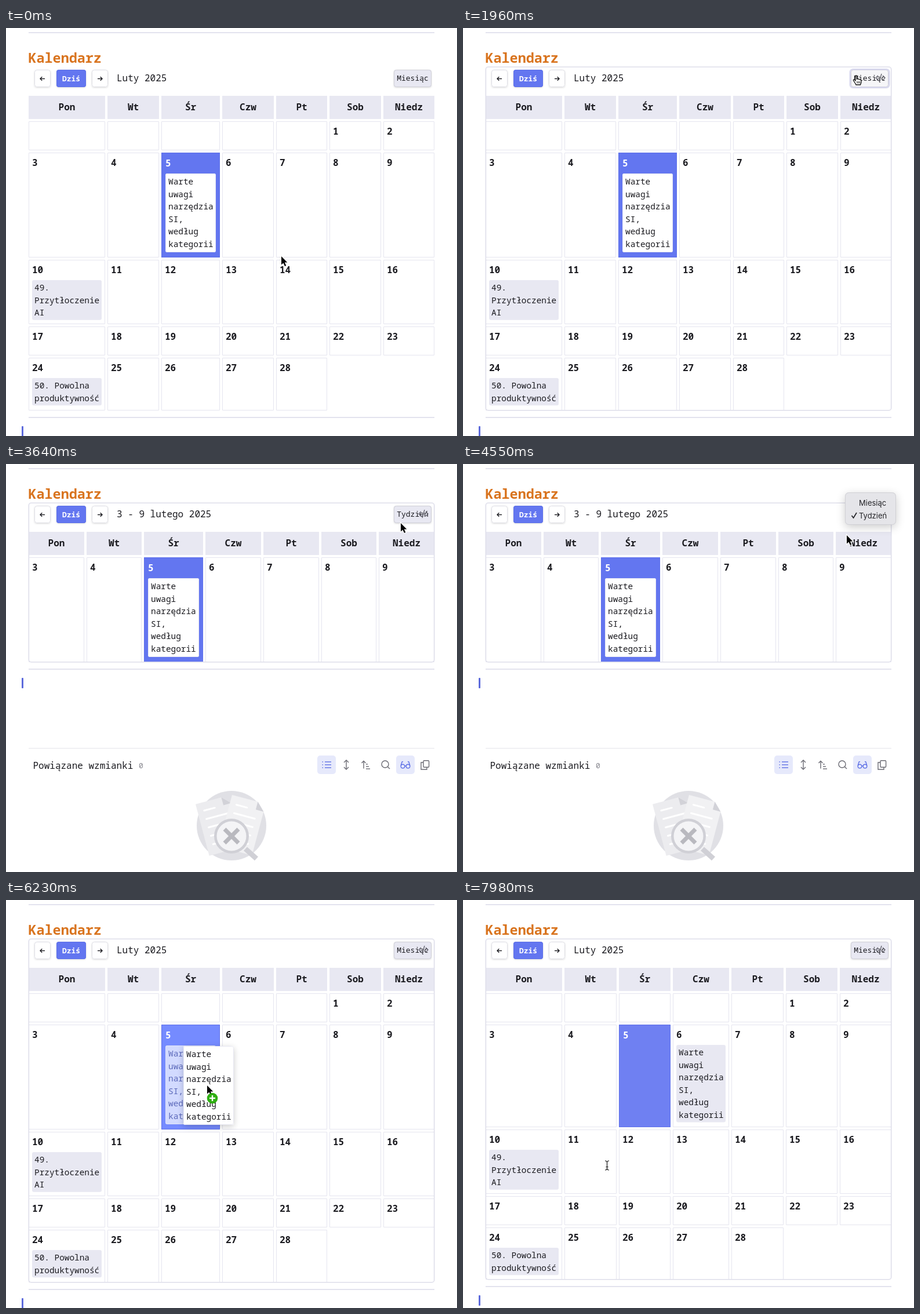
These frames come from a looping animation (778x704 px, 8 s). An HTML page with a canvas:

```html
<!DOCTYPE html>
<html lang="pl">
<head>
<meta charset="utf-8">
<title>Kalendarz</title>
<style>
html, body { margin: 0; width: 778px; height: 704px; overflow: hidden; background: #fff; }
canvas { display: block; }
</style>
</head>
<body>
<canvas id="stage" width="778" height="704"></canvas>
<script>
const g = document.getElementById('stage').getContext('2d');
const MONO = '"Noto Sans Mono", "DejaVu Sans Mono", monospace';
const UI = 'Inter, "Open Sans", sans-serif';
const INK = '#1b1b20', BLUE = '#6376f0', PALE = '#e8e8f2', EDGE = '#e5e5ef', RULE = '#e3e3ee';
const GRAY = '#6a6a73', ACCENT = '#6072e6';
const LOOP = 8000, STEP = 70;
const LEFT = 39, WIDTH = 700, TOP = 161, GAP = 4;
const SMALL = 14.4, LEADING = 21.6, TODAY = 5;

const DAYS = ['Pon', 'Wt', 'Śr', 'Czw', 'Pt', 'Sob', 'Niedz'];
const TOOLS = ['Warte', 'uwagi', 'narzędzia', 'SI,', 'według', 'kategorii'];
const NOTES = { 10: ['49.', 'Przytłoczenie', 'AI'], 24: ['50. Powolna', 'produktywność'] };

// Columns fit their longest word, the rest share what is left; rows fit their tallest event.
function layout(label, mode, first, last, events) {
  const fit = Array(7).fill(0), heights = [];
  for (let day = first; day <= last; day++) {
    const col = (day - first) % 7, row = Math.floor((day - first) / 7);
    const note = events[day], extra = day === TODAY ? 4 : 0;
    heights[row] ??= 50;
    if (!note) continue;
    const chars = Math.max(...note.map(s => s.length));
    fit[col] = Math.max(fit[col], chars * SMALL * 0.6 + 20 + extra);
    heights[row] = Math.max(heights[row], note.length * LEADING + 46.9 + extra * 1.05);
  }
  const used = fit.reduce((a, b) => a + b), free = fit.filter(w => !w).length;
  const share = (WIDTH - 6 * GAP - used) / free;
  const edges = (start, sizes) => {
    const list = [start];
    for (const s of sizes) list.push(start += s + GAP);
    return list.map(Math.round);
  };
  return {
    label, mode, first, last, events,
    cols: edges(LEFT, fit.map(w => w || share)), rows: edges(TOP, heights)
  };
}

const MONTH = layout('Luty 2025', 'Miesiąc', -4, 28, { ...NOTES, 5: TOOLS });
const MOVED = layout('Luty 2025', 'Miesiąc', -4, 28, { ...NOTES, 6: TOOLS });
const WEEK = layout('3 - 9 lutego 2025', 'Tydzień', 3, 9, { 5: TOOLS });

const MENUS = [
  { from: 2170, to: 3290, top: 71, checked: 0 },
  { from: 4270, to: 5180, top: 49, checked: 1 }
];
const DRAG = { from: 5880, to: 6650, x: 316, y: 319 };

// pointer moves: start, end, x, y
const MOVES = [
  [70, 1890, 680, 89], [2380, 2870, 678, 113], [3430, 3850, 684, 91],
  [4270, 4550, 662, 123], [4550, 4970, 690, 68], [5180, 5740, DRAG.x, DRAG.y],
  [5880, 6580, 378, 321], [6650, 7070, 196, 430], [7350, 7910, 248, 458]
];

function pointer(t) {
  let x = 475, y = 394;
  for (const [from, to, tx, ty] of MOVES) {
    const p = Math.min(1, Math.max(0, (t - from) / (to - from)));
    const e = p * p * (3 - 2 * p);
    x += (tx - x) * e;
    y += (ty - y) * e;
  }
  return { x, y };
}

function text(str, x, y, size, color = INK, weight = 500, align = 'left', family = MONO) {
  g.font = `${weight} ${size}px ${family}`;
  g.textAlign = align;
  g.fillStyle = color;
  g.fillText(str, x, y);
}

function fill(x, y, w, h, color, r = 0) {
  g.fillStyle = color;
  g.beginPath();
  g.roundRect(x, y, w, h, r);
  g.fill();
}

function frame(x, y, w, h, color, r = 0, lw = 1) {
  g.strokeStyle = color;
  g.lineWidth = lw;
  g.beginPath();
  g.roundRect(x + lw / 2, y + lw / 2, w - lw, h - lw, r);
  g.stroke();
}

function trace(pts) {
  g.beginPath();
  for (let i = 0; i < pts.length; i += 2) g.lineTo(pts[i], pts[i + 1]);
}

function line(color, lw, ...pts) {
  trace(pts);
  g.strokeStyle = color;
  g.lineWidth = lw;
  g.stroke();
}

function poly(color, ...pts) {
  trace(pts);
  g.fillStyle = color;
  g.fill();
}

function disc(x, y, r, color) {
  g.fillStyle = color;
  g.beginPath();
  g.arc(x, y, r, 0, 7);
  g.fill();
}

function ring(x, y, r, color) {
  g.strokeStyle = color;
  g.lineWidth = 1.4;
  g.beginPath();
  g.arc(x, y, r, 0, 7);
  g.stroke();
}

function at(x, y, angle, paint) {
  g.save();
  g.translate(x, y);
  g.rotate(angle);
  paint();
  g.restore();
}

function shadow(blur, dy, alpha) {
  g.shadowColor = `rgba(0,0,0,${alpha})`;
  g.shadowBlur = blur;
  g.shadowOffsetY = dy;
}

function raised(x, y, w, h, color, r, blur, dy, alpha) {
  g.save();
  shadow(blur, dy, alpha);
  fill(x, y, w, h, color, r);
  g.restore();
}

function button(x, w, color, edge) {
  raised(x, 72, w, 30, color, 4, 3, 1, 0.14);
  frame(x, 72, w, 30, edge, 4);
}

// arrow along the x axis with its tip at +r
function shaft(r, head, color, both) {
  line(color, 1.4, -r, 0, r, 0);
  line(color, 1.4, r - head, -head, r, 0, r - head, head);
  if (both) line(color, 1.4, head - r, -head, -r, 0, head - r, head);
}

function toolbar(view, hover, shown) {
  button(49, 28, '#fff', '#dedee5');
  button(87, 51, BLUE, '#5c6fe8');
  button(148, 28, '#fff', '#dedee5');
  at(63, 87.5, Math.PI, () => shaft(4, 3.3, INK));
  at(162, 87.5, 0, () => shaft(4, 3.3, INK));
  text('Dziś', 112.5, 92, 13, '#fff', 700, 'center');
  text(view.label, 191, 92, 16);
  button(669, 65, hover ? '#f6f6f8' : PALE, '#cfcfd7');
  if (hover) frame(666.5, 70, 70, 34, '#d8d8ee', 5, 2.5);
  text(view.mode, 701.5, 91, 13, INK, 500, 'center');
  g.globalAlpha = shown;
  at(720, 86, 0, () => {
    for (const s of [-1, 1]) line('#5c5c66', 1.3, 4 * s, -4, 8 * s, 0, 4 * s, 4);
    line('#5c5c66', 1.3, 2, -7, -2, 7);
  });
  g.globalAlpha = 1;
}

function eventText(lines, x, y, ink) {
  lines.forEach((s, i) => text(s, x, y + 5 + i * LEADING, SMALL, ink));
}

function whiteEvent(x, y, w, ink) {
  fill(x, y, w, 136, '#fff', 3);
  frame(x, y, w, 136, PALE, 3);
  eventText(TOOLS, x + 5, y + 14, ink);
}

function todayCell(x, y, w, h, note, dragging) {
  fill(x, y, w, h, dragging ? '#758bff' : note ? BLUE : '#6f80f2');
  frame(x, y, w, h, '#5f71ea');
  text(TODAY, x + 7, y + 24, 16, '#fff', 700);
  if (!note) return;
  g.globalAlpha = dragging ? 0.68 : 1;
  whiteEvent(x + 7, y + 36, w - 14, dragging ? '#24349a' : INK);
  g.globalAlpha = 1;
}

function cell(day, x, y, w, h, note) {
  frame(x, y, w, h, EDGE);
  if (day > 0) text(day, x + 6, y + 23, 16, INK, 700);
  if (!note) return;
  fill(x + 6, y + 35, w - 12, note.length * LEADING + 4, PALE, 3);
  eventText(note, x + 10, y + 48);
}

function calendar(view, dragging, shown) {
  const { cols, rows, first, last, events } = view;
  const end = rows.at(-1) - GAP;
  DAYS.forEach((name, c) => {
    const w = cols[c + 1] - cols[c] - GAP;
    fill(cols[c], 117, w, 40, PALE);
    text(name, cols[c] + w / 2, 142, 16, INK, 700, 'center');
  });
  for (let day = first; day <= last; day++) {
    const c = (day - first) % 7, r = Math.floor((day - first) / 7);
    const x = cols[c], y = rows[r];
    const w = cols[c + 1] - x - GAP, h = rows[r + 1] - y - GAP;
    if (day === TODAY) todayCell(x, y, w, h, events[day], dragging);
    else cell(day, x, y, w, h, events[day]);
  }
  g.globalAlpha = shown;
  frame(LEFT - 0.5, 66.5, WIDTH + 1, end - 66, '#dedeea', 4, 1.6);
  g.globalAlpha = 1;
  fill(LEFT, end + 11, WIDTH, 2, RULE);
  fill(27, end + 27, 3, 18, '#5d6bdc', 1);
}

const ICONS = [
  () => {
    for (const y of [-5, 0, 5]) {
      line(ACCENT, 1.4, -3, y, 8, y);
      line(ACCENT, 1.4, -7.5, y, -6, y);
    }
  },
  () => at(0, 0, Math.PI / 2, () => shaft(8, 4, GRAY, true)),
  () => {
    at(-4, 0, -Math.PI / 2, () => shaft(6.5, 3.5, GRAY));
    for (let i = 0; i < 3; i++) line(GRAY, 1.4, 0, -1 + i * 4, 3 + i * 2, -1 + i * 4);
  },
  () => {
    ring(-1, -1, 6, GRAY);
    line(GRAY, 1.4, 3.5, 3.5, 7, 7);
  },
  () => {
    for (const s of [-1, 1]) {
      ring(4.5 * s, 2.5, 3.3, ACCENT);
      line(ACCENT, 1.4, 7.8 * s, 1.5, 6 * s, -5, 4 * s, -5.5);
    }
    line(ACCENT, 1.4, -1, 2, 1, 2);
  },
  () => {
    frame(-3.7, -8, 11, 13, GRAY, 1.5, 1.4);
    line(GRAY, 1.4, -3, -4, -7, -4, -7, 8, 3, 8, 3, 4.5);
  }
];

// a sheet with a folded corner, hung from its top left corner
function paper(x, y, angle, color) {
  at(x, y, angle, () => {
    poly(color, 0, 0, 46, 0, 60, 14, 60, 92, 0, 92);
    poly('#d2d2d8', 46, 0, 60, 14, 46, 14);
    for (let i = 0; i < 5; i++) fill(10, 13 + i * 15, i ? 40 : 22, 3, '#fff', 1.5);
  });
}

function emptyArt() {
  at(389, 624, 0, () => {
    disc(0, 0, 60, '#e0e0e5');
    paper(-62, -37, -0.26, '#ececef');
    paper(1, -53, 0.26, '#f1f1f3');
    line('#d0d0d6', 9, 24, 40, 43, 57);
    disc(0, 18, 30, '#d0d0d6');
    disc(0, 18, 25.5, '#f4f4f6');
    for (const s of [-12, 12]) line('#b9b9bf', 7, -s, 6, s, 30);
  });
}

function mentions() {
  fill(LEFT, 490, WIDTH, 1, '#e4e4ea');
  text('Powiązane wzmianki', 46.5, 526, 16);
  text('0', 229, 525, 13, '#85858d');
  ICONS.forEach((paint, i) => {
    const x = 553 + i * 34;
    if (i % 4 === 0) fill(x - 16, 503, 32, 32, '#e6e9fb', 5);
    at(x, 519, 0, paint);
  });
  emptyArt();
}

function menu(m, pos) {
  raised(659, m.top, 88, 56, '#e5e5e9', 6, 16, 4, 0.2);
  frame(659, m.top, 88, 56, '#d0d0d5', 6);
  ['Miesiąc', 'Tydzień'].forEach((name, i) => {
    const y = m.top + 18 + i * 22;
    const over = Math.abs(pos.y - y - 3) < 12;
    const color = over ? '#fff' : '#242428';
    if (over) fill(665, y - 12, 76, 22, '#489bff', 4);
    if (i === m.checked) line(color, 1.7, 670.5, y, 673.5, y + 4, 679, y - 5);
    text(name, 683, y + 4.5, 13, color, 400, 'left', UI);
  });
}

const ARROW = new Path2D('M0 0V14.5L3.4 11.4L6 17L8.3 16L5.8 10.6H10.3Z');
const HAND = new Path2D('M-3 7L-6.5 1.5Q-7 -.5 -5 0L-3 2V-6Q-2 -8 -.6 -6V-1Q1 -2 2 -.6Q4 -1.4 4.8 .4Q7 0 7 2V5L5.5 9H-2Z');
const BEAM = new Path2D('M-3 -8Q.5 -8 .5 -5V5Q.5 8 -3 8M4 -8Q.5 -8 .5 -5M4 8Q.5 8 .5 5M-1.5 2.5H2.5');

function ink(path, color, lw) {
  g.strokeStyle = color;
  g.lineWidth = lw;
  g.stroke(path);
}

function plain() {
  ink(ARROW, '#fff', 2.4);
  g.fillStyle = '#000';
  g.fill(ARROW);
}

const POINTERS = {
  plain,
  copy() {
    plain();
    disc(9, 22, 9.3, '#2fae12');
    line('#fff', 2.4, 4, 22, 14, 22);
    line('#fff', 2.4, 9, 17, 9, 27);
  },
  text() {
    ink(BEAM, '#fff', 3);
    ink(BEAM, '#1a1a1a', 1.2);
  },
  hand() {
    g.fillStyle = '#fff';
    g.fill(HAND);
    ink(HAND, '#111', 1.3);
    for (let x = 0; x < 6; x += 2.3) line('#111', 1, x, 3, x, 6.5);
  }
};

function draw(t) {
  const pos = pointer(t);
  const open = MENUS.find(m => t >= m.from && t < m.to);
  const dragging = t >= DRAG.from && t < DRAG.to;
  const view = t >= DRAG.to ? MOVED : t >= MENUS[0].to && t < MENUS[1].to ? WEEK : MONTH;
  const hover = !open && pos.x > 669 && pos.x < 734 && pos.y > 72 && pos.y < 102;
  const shown = Math.min(1, t / 280);

  fill(0, 0, 778, 704, '#fff');
  fill(LEFT, 7, WIDTH, 2, RULE);
  text('Kalendarz', 38.5, 60, 23.4, '#d9741f', 700);
  calendar(view, dragging, shown);
  toolbar(view, hover, shown);
  if (view === WEEK) mentions();
  if (open) menu(open, pos);
  if (dragging) {
    const x = 275 + pos.x - DRAG.x, y = 251 + pos.y - DRAG.y;
    raised(x, y, 87, 136, '#fff', 3, 12, 3, 0.2);
    whiteEvent(x, y, 87);
  }
  const kind = t >= 6860 ? 'text' : dragging ? 'copy' : hover ? 'hand' : 'plain';
  at(Math.round(pos.x), Math.round(pos.y), 0, POINTERS[kind]);
}

function tick() {
  const t = performance.now() % LOOP;
  draw(Math.floor(t / STEP) * STEP);
  requestAnimationFrame(tick);
}
tick();
</script>
</body>
</html>
```
